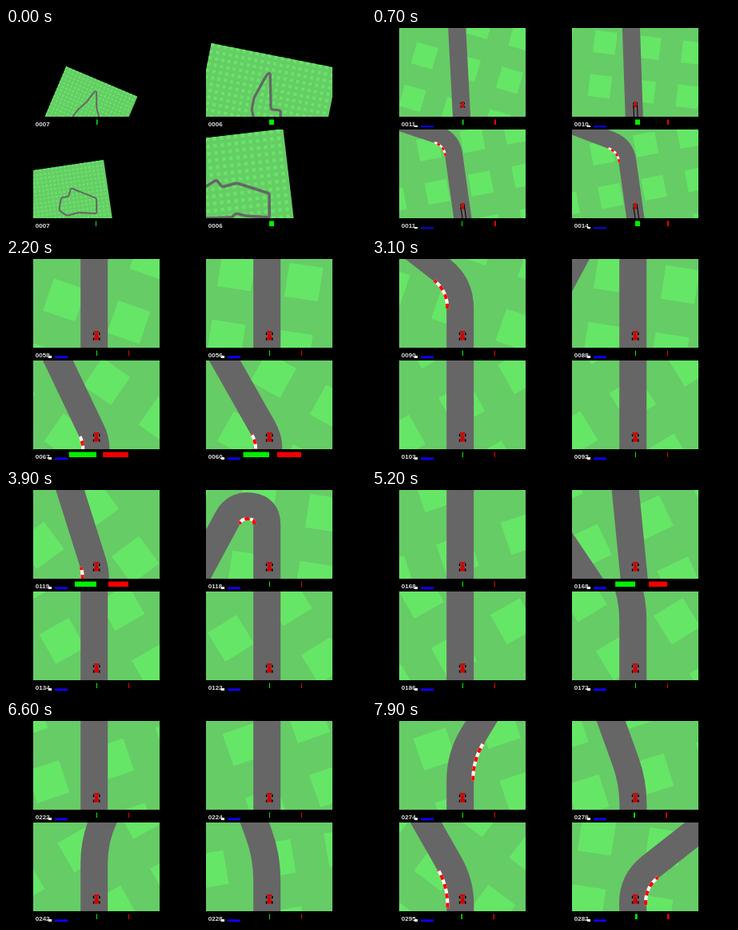
These frames come from a looping animation (450x254 px, 8000 ms). An HTML page with a canvas:

```html
<!DOCTYPE html>
<html lang="en">
<head>
<meta charset="utf-8">
<title>Four racing agents</title>
<style>
html, body { margin: 0; width: 100%; height: 100%; overflow: hidden; background: #000; }
canvas { display: block; }
</style>
</head>
<body>
<canvas id="stage" width="450" height="254"></canvas>
<script>
const ctx = document.getElementById('stage').getContext('2d');
const LOOP = 8000, STEP = 100, LAUNCH = 700, END = 7900;
const CELL = 85, ROAD = 34, START = 60;
const VIEW = { w: 158, h: 111, carX: 79.2, carY: 96 };

// track: corners in world pixels; dist, pace: how far and how evenly the car drives
// score: at the start, at launch and at the end
// corner, tilt, circuit: the whole field as first seen from the car
const panels = [
  {
    x: 34, y: 0, zoom: .057, tilt: 23, corner: [-38, -48],
    score: [7, 11, 274], steer: 1.5, yaw: 3, dist: 750, pace: 1.1,
    track: [[28, 213], [-86, -116], [-576, -282], [-660, -382]],
    circuit: [[-30, 15], [-23, 6], [-13, -3], [-2, -17], [0, -16], [0, 4], [3, 15]]
  },
  {
    x: 250, y: 0, zoom: .095, tilt: 11.2, corner: [-72.5, -77], skid: true,
    score: [6, 10, 278], steer: 6, yaw: 2, dist: 729, pace: 1.12,
    track: [[78, 172], [13, -250], [-27, -249], [-144, 81], [-139, 231]],
    circuit: [[-20, 15], [-22, 6], [-19, -9], [-3, -38], [1, -40], [2, 6], [14, 7], [14, 20]]
  },
  {
    x: 34, y: 127, zoom: .06, tilt: -8.4, corner: [-92, -43], skid: true,
    score: [7, 11, 295], steer: -1, yaw: 8, dist: 728, pace: 1.03,
    track: [[36, 181], [46, -9], [-428, -276], [-474, -341], [-612, -400]],
    circuit: [[0, 9], [0, -10], [-23, -19], [-32, -23], [-35, -12], [-44, -11], [-47, 5], [-37, 12], [-23, 8], [0, 9]]
  },
  {
    x: 250, y: 127, zoom: .105, tilt: -6.7, corner: [-160, -76], skid: true,
    score: [6, 14, 282], steer: 6, yaw: 8, dist: 747, pace: 1.12,
    track: [[37, 173], [46, -5], [-310, -224], [-430, -244], [-546, -222], [-670, -338]],
    circuit: [[-82, -23], [-66, -33], [-59, -24], [-41, -29], [0, -16], [0, 14], [-29, 12], [-42, 9], [-47, 14], [-80, 15]]
  }
];

const rad = d => d * Math.PI / 180;
const lerp = (a, b, u) => a + (b - a) * u;
const gap = (a, b) => Math.hypot(b[0] - a[0], b[1] - a[1]);
const toward = (a, b, d) => [0, 1].map(i => a[i] + (b[i] - a[i]) * d / gap(a, b));
const bearing = (a, b) => Math.atan2(b[0] - a[0], a[1] - b[1]);
const wrap = a => Math.atan2(Math.sin(a), Math.cos(a));

function svgPath(d) {
  const path = document.createElementNS('http://www.w3.org/2000/svg', 'path');
  path.setAttribute('d', d);
  return path;
}

// A line through the points with rounded corners, and where each corner lies on it
function rounded(pts, cut) {
  let d = `M${pts[0]}`;
  const bends = [];
  for (let i = 1; i < pts.length - 1; i++) {
    const [a, b, c] = pts.slice(i - 1, i + 2);
    const k = Math.min(cut, gap(a, b) / 2, gap(b, c) / 2);
    d += `L${toward(b, a, k)}`;
    const from = svgPath(d).getTotalLength();
    d += `Q${b} ${toward(b, c, k)}`;
    bends.push({ from, to: svgPath(d).getTotalLength(), turn: wrap(bearing(b, c) - bearing(a, b)) });
  }
  return { d: d + `L${pts[pts.length - 1]}`, bends };
}

// A point on the track, moved sideways to the right
function pointAt(p, s, side = 0) {
  const [a, q, b] = [s - 1, s, s + 1].map(v => p.line.getPointAtLength(v));
  const len = Math.hypot(b.x - a.x, b.y - a.y) || 1;
  return [q.x - (b.y - a.y) / len * side, q.y + (b.x - a.x) / len * side];
}

function strip(p, from, to, side) {
  const path = new Path2D();
  for (let s = from; s <= to; s += 2) path.lineTo(...pointAt(p, s, side));
  return path;
}

function build(p) {
  const { d, bends } = rounded(p.track, 30);
  p.line = svgPath(d);
  p.road = new Path2D(d);
  p.loop = new Path2D(rounded(p.circuit, 2.5).d);
  p.kerbs = bends.filter(b => Math.abs(b.turn) > rad(28))
    .map(b => strip(p, b.from, b.to, Math.sign(b.turn) * (ROAD / 2 - 1)));
  p.skids = p.skid ? [0, 7].map(side => strip(p, START - 26, START, side - .5)) : [];
}
panels.forEach(build);

const progress = t => (t - LAUNCH) / (END - LAUNCH);
const zoomAt = (p, t) => Math.min(1, lerp(p.zoom, .65, t / LAUNCH));

function travel(p, t) {
  const u = progress(t);
  return START + (u < 0 ? 200 * u : p.dist * u ** p.pace);
}

// The nose lags behind the track's direction and slides at the launch
function headingAt(p, t) {
  const s = travel(p, t);
  const slide = t < 1500 ? Math.sin(Math.PI * t / 1500) * rad(p.yaw) : 0;
  return bearing(pointAt(p, s - 30), pointAt(p, s + 5)) + slide;
}

function scoreAt(p, t) {
  const [first, launch, last] = p.score;
  return Math.round(t < LAUNCH ? lerp(first, launch, t / LAUNCH) : lerp(launch, last, progress(t) ** p.pace));
}

function stroke(path, color, width, dash = []) {
  ctx.strokeStyle = color;
  ctx.lineWidth = width;
  ctx.setLineDash(dash);
  ctx.stroke(path);
}

function box(color, x, y, w, h) {
  ctx.fillStyle = color;
  ctx.fillRect(x, y, w, h);
}

function grass(x, y, n) {
  box('#66cc66', x, y, n * CELL, n * CELL);
  for (let i = 0; i < n; i++)
    for (let j = 0; j < n; j++)
      box('#66e666', x + i * CELL, y + j * CELL, CELL / 2, CELL / 2);
}

function drawOverview(p) {
  ctx.scale(1 / p.zoom, 1 / p.zoom);
  ctx.save();
  ctx.translate(...p.corner);
  ctx.rotate(rad(p.tilt));
  ctx.scale(p.zoom, p.zoom);
  grass(0, 0, 20);
  ctx.restore();
  stroke(p.loop, '#666', ROAD * p.zoom);
}

function drawTrack(p, t) {
  const [x, y] = pointAt(p, travel(p, t), 3);
  const corner = v => (Math.round(v / CELL) - 7.25) * CELL;
  ctx.rotate(-headingAt(p, t));
  ctx.translate(-x, -y);
  grass(corner(x), corner(y), 15);
  stroke(p.road, '#666', ROAD);
  for (const kerb of p.kerbs) {
    stroke(kerb, '#fff', 4);
    stroke(kerb, '#f00', 4, [6, 6]);
  }
  for (const mark of p.skids) stroke(mark, '#000', 1.6);
}

function drawCar() {
  for (const x of [-4.4, 2.8]) for (const y of [-4, 2.5]) box('#000', x, y, 1.6, 3.2);
  box('#d00000', -3.5, -6, 7, 1.8);
  ctx.beginPath();
  ctx.moveTo(-.9, -6);
  ctx.lineTo(.9, -6);
  ctx.lineTo(3.4, 5.5);
  ctx.lineTo(-3.4, 5.5);
  ctx.fill();
}

function drawGauges(p, t) {
  ctx.font = 'bold 8px "Liberation Sans", Arial, sans-serif';
  ctx.fillStyle = '#ddd';
  ctx.fillText(String(scoreAt(p, t)).padStart(4, '0'), 2.8, 123);
  const bar = (color, x, w) => box(color, Math.min(x, x + w), 114.5, Math.max(1, Math.abs(w)), 6.5);
  // degrees turned per 200 ms
  const turn = wrap(headingAt(p, Math.min(t + 100, END)) - headingAt(p, Math.max(t - 100, 0))) / rad(1);
  bar('#00f000', 79, t < 1000 ? p.steer : turn * 1.4);
  if (!t) return;
  const h = t < 1000 ? 2 : 3;
  box('#fff', 19, 124 - h, 4, h);
  box('#1000f0', 27, 124.3 - h, 16, h);
  bar('#f00000', 119, t < 1000 ? 2 : turn * 1.3);
}

function drawPanel(p, t) {
  const zoom = zoomAt(p, t);
  ctx.save();
  ctx.translate(p.x, p.y);
  drawGauges(p, t);
  ctx.beginPath();
  ctx.rect(0, 0, VIEW.w, VIEW.h);
  ctx.clip();
  ctx.translate(VIEW.carX, VIEW.carY);
  ctx.scale(zoom, zoom);
  ctx.save();
  if (zoom < .3) drawOverview(p);
  else drawTrack(p, t);
  ctx.restore();
  drawCar();
  ctx.restore();
}

function frame(now) {
  const t = Math.floor(now % LOOP / STEP) * STEP;
  box('#000', 0, 0, 450, 254);
  panels.forEach(p => drawPanel(p, t));
  requestAnimationFrame(frame);
}
requestAnimationFrame(frame);
</script>
</body>
</html>
```
